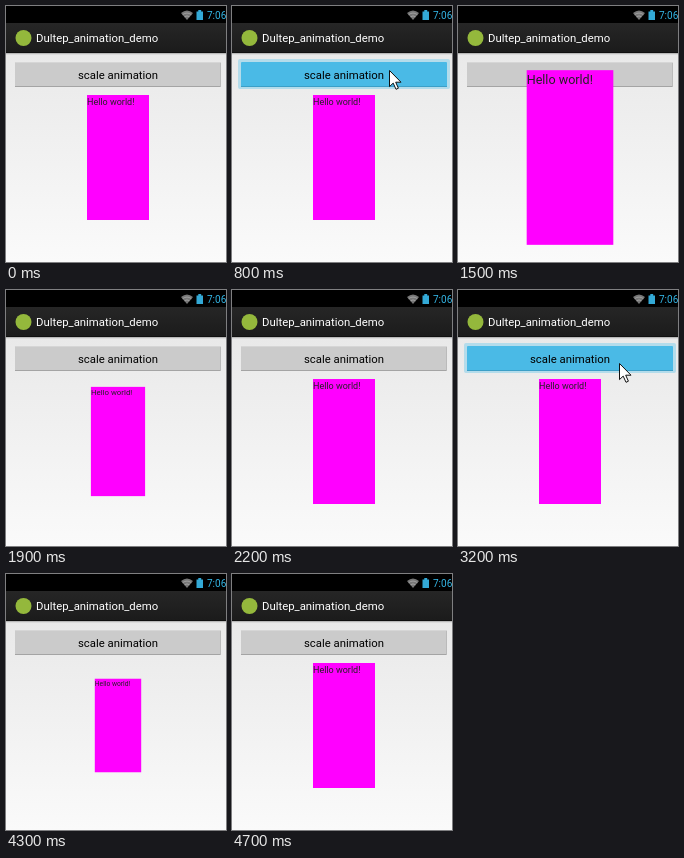
An HTML page that plays this animation: 220 px wide and 256 px high, repeating every 5.2 s.

```html
<!DOCTYPE html>
<html lang="en">
<head>
<meta charset="utf-8">
<title>Scale animation</title>
<style>
  html, body { margin: 0; width: 100%; height: 100%; overflow: hidden; background: #000; }
  svg { display: block; width: 220px; height: 256px; }
  text { font-family: Roboto, "Noto Sans", sans-serif; }
</style>
</head>
<body>
<svg viewBox="0 0 220 256">
  <defs>
    <linearGradient id="page" x2="0" y2="1">
      <stop stop-color="#e9e9e9"/><stop offset="1" stop-color="#fafafa"/>
    </linearGradient>
    <linearGradient id="bar" x2="0" y2="1">
      <stop stop-color="#262626"/><stop offset="1" stop-color="#1b1b1b"/>
    </linearGradient>
  </defs>

  <rect y="47" width="220" height="209" fill="url(#page)"/>
  <rect width="220" height="17" fill="#000"/>
  <rect y="17" width="220" height="30" fill="url(#bar)"/>
  <rect y="46" width="220" height="1" fill="#101010"/>
  <rect y="47" width="220" height="1" fill="#b8b8b8"/>
  <rect y="48" width="220" height="1" fill="#dcdcdc"/>

  <!-- status icons -->
  <path d="M175 7Q181 2 187 7L181 14Z" fill="#777"/>
  <path d="M176.6 8.7Q181 5.4 185.4 8.7M178.5 10.8Q181 9 183.5 10.8" fill="none" stroke="#aaa" stroke-width=".8"/>
  <path d="M190.5 5.5H192.3V4H195.2V5.5H197V14H190.5Z" fill="#33a9d6"/>
  <text x="201" y="13" font-size="10" fill="#33b5e5">7:06</text>

  <circle cx="17.5" cy="32" r="8" fill="#94b83c"/>
  <text x="30" y="36" font-size="11.35" fill="#fff">Dultep_animation_demo</text>

  <g id="idle">
    <rect x="9" y="56" width="206" height="25" rx="1" fill="#cbcbcb"/>
    <path d="M9.5 56.5H214.5" stroke="#d6d6d6"/>
    <path d="M9 80.5H215" stroke="#a4a4a4"/>
    <path d="M214.5 57V81" stroke="#bababa"/>
  </g>
  <g id="pressed">
    <rect x="6" y="53" width="212" height="30" rx="2" fill="#b4dceb"/>
    <rect x="9" y="56" width="206" height="25" rx="1" fill="#4abae6"/>
    <path d="M9 80.5H215" stroke="#3c9fc7"/>
  </g>
  <text x="72" y="72.5" font-size="11.35" fill="#000">scale animation</text>

  <g id="box">
    <rect x="81" y="89" width="62" height="125" fill="#f0f"/>
    <text x="81" y="98.6" font-size="9" fill="#262026">Hello world!</text>
  </g>
  <path id="cursor" d="M.5 .5V16.6L4.2 13.1L7 19.3L9.4 18.2L6.7 12.2H12Z" fill="#fff" stroke="#111"/>
</svg>
<script>
const LOOP = 5200, STEP = 100;
const CENTER = [112, 151.5], MAX_SCALE = 1.4;
const el = id => document.getElementById(id);
const idle = el("idle"), pressed = el("pressed"), box = el("box"), cursor = el("cursor");

// Each click: press time, starting phase and phase gained per step
const taps = [
  { press: 800, phase: 0.06, gain: 0.152 },
  { press: 3200, phase: 0.042, gain: 0.148 }
];

// Pointer visits: [time, x, y]; hidden after the last entry
const visits = [
  [[200, 174, 130], [300, 168, 106], [400, 160, 76], [500, 157, 64], [1000, 157, 64], [1200, 190, 100]],
  [[2400, 196, 196], [2600, 183, 150], [2900, 163, 82], [3000, 161, 73], [3500, 161, 73], [3700, 192, 110]]
];

const ease = p => (1 - Math.cos(Math.PI * p)) / 2;
const show = (node, on) => node.setAttribute("visibility", on ? "visible" : "hidden");

// Two restarting runs from nothing to full scale, then back to rest
function scaleAt(t) {
  for (const { press, phase, gain } of taps) {
    if (t <= press) continue;
    const p = phase + gain * (t - press - STEP) / STEP;
    if (p < 2) return MAX_SCALE * ease(p % 1);
  }
  return 1;
}

function pointerAt(t) {
  for (const path of visits) {
    for (let i = 1; i < path.length; i++) {
      const [t0, x0, y0] = path[i - 1], [t1, x1, y1] = path[i];
      if (t < t0 || t > t1) continue;
      const k = (t - t0) / (t1 - t0);
      return [x0 + (x1 - x0) * k, y0 + (y1 - y0) * k];
    }
  }
  return null;
}

function draw(t) {
  const down = taps.some(tap => t === tap.press);
  show(pressed, down);
  show(idle, !down);

  const s = scaleAt(t), [cx, cy] = CENTER;
  box.setAttribute("transform", `translate(${cx} ${cy}) scale(${s}) translate(${-cx} ${-cy})`);

  const at = pointerAt(t);
  show(cursor, at);
  if (at) cursor.setAttribute("transform", `translate(${at})`);
}

const start = performance.now();
function tick() {
  const t = (performance.now() - start) % LOOP;
  draw(Math.floor(t / STEP) * STEP);
  requestAnimationFrame(tick);
}
tick();
</script>
</body>
</html>
```
